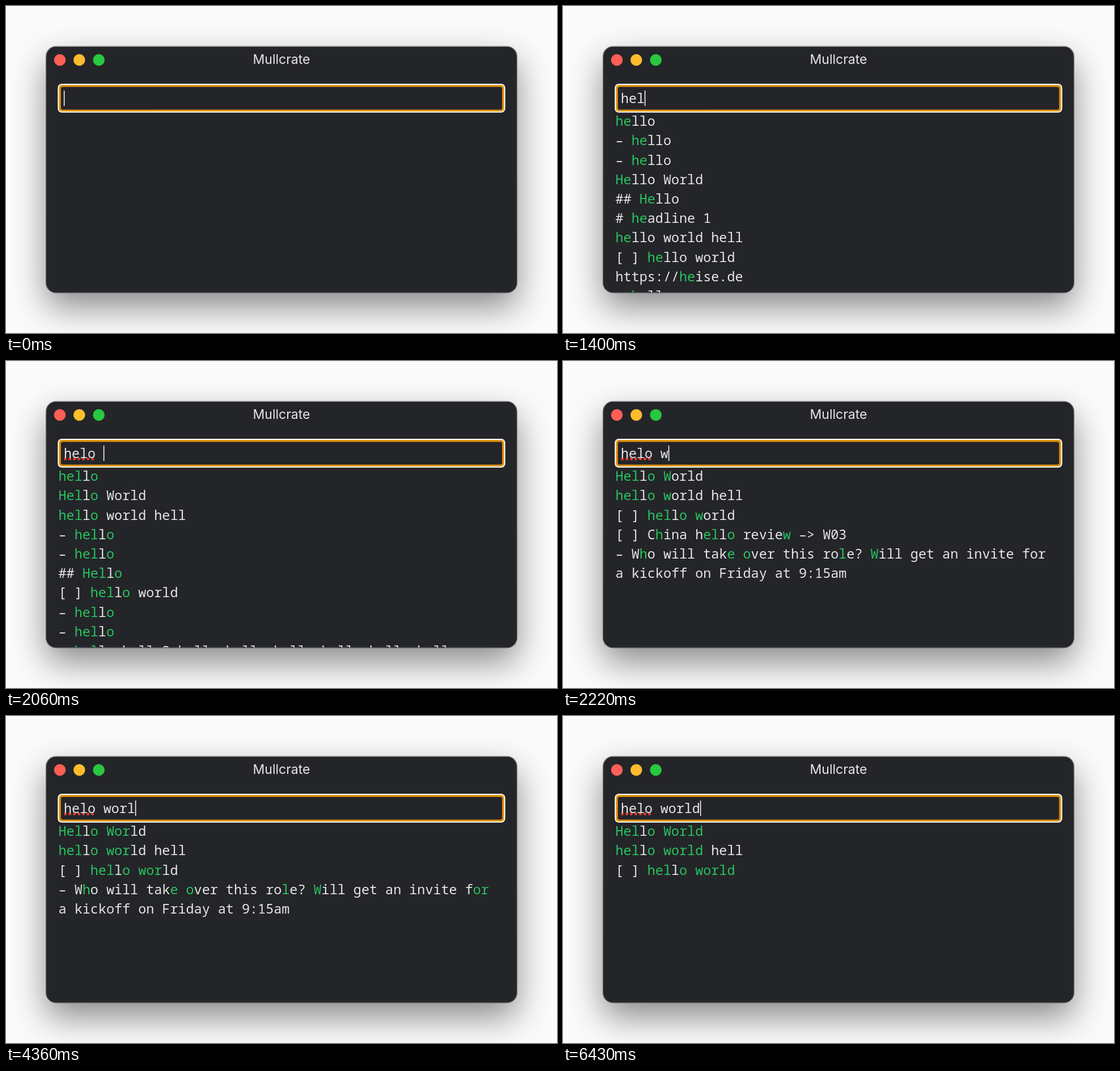
Animation, 972 px wide and 576 px high, one loop 6680 ms. Source, as an HTML page:

```html
<!DOCTYPE html>
<html lang="en">
<head>
<meta charset="utf-8">
<title>Fuzzy search</title>
<style>
  html, body { margin: 0; width: 100%; height: 100%; overflow: hidden; background: #fafafa; }
  svg { display: block; width: 972px; height: 576px; }
  text { white-space: pre; fill: #e6e6e7; }
  .mono { font-family: "Noto Sans Mono", "DejaVu Sans Mono", monospace; font-size: 23.45px; }
  #query { font-size: 23.33px; }
  .title { font-family: Inter, sans-serif; font-size: 23px; text-anchor: middle; }
  .hit { fill: #27c45f; }
</style>
</head>
<body>
<svg viewBox="0 0 972 576">
  <defs>
    <filter id="blur" x="-30%" y="-50%" width="160%" height="200%">
      <feGaussianBlur stdDeviation="30"/>
    </filter>
    <linearGradient id="rim" x1="0" y1="0" x2="0" y2="1">
      <stop offset="0" stop-color="#8b8d8f"/>
      <stop offset=".06" stop-color="#66686a"/>
      <stop offset="1" stop-color="#55575a"/>
    </linearGradient>
    <clipPath id="frame"><rect x="71" y="72" width="830" height="432.5" rx="17"/></clipPath>
  </defs>
  <rect width="972" height="576" fill="#fafafa"/>
  <rect x="71" y="97" width="830" height="433" rx="17" opacity=".45" filter="url(#blur)"/>
  <rect x="70.7" y="71.2" width="830.6" height="433.8" rx="17.5" fill="#242529" stroke="url(#rim)" stroke-width="1.3"/>

  <circle cx="95" cy="95" r="10.3" fill="#ff5f57"/>
  <circle cx="129.3" cy="95" r="10.3" fill="#febc2e"/>
  <circle cx="163.7" cy="95" r="10.3" fill="#28c840"/>
  <text class="title" x="486" y="102">Mullcrate</text>

  <rect x="91.3" y="137" width="789.4" height="50.8" rx="7" fill="#fff"/>
  <rect x="93.3" y="139" width="785.4" height="46.8" rx="5" fill="#e0940f"/>
  <rect x="96.8" y="142.4" width="778.4" height="40" rx="3" fill="#242529"/>

  <path id="typo" d="M104.6 172.6H153" stroke="#d93a32" stroke-width="5" stroke-linecap="round" stroke-dasharray="0 8"/>
  <text id="query" class="mono" x="101.9" y="171"></text>
  <rect id="caret" y="149" width="1.5" height="27" fill="#fff"/>
  <g id="results" clip-path="url(#frame)"></g>
</svg>
<script>
const LOOP = 6680;
const LEFT = 92.5, BASELINE = 211.2, LINE = 34.2;
const CARET_X = 101.9, CARET_STEP = 14;

const plain = 'hello', bullet = '– hello', heading = '## Hello';
const title = 'Hello World', phrase = 'hello world hell', task = '[ ] hello world';
const review = '[ ] China hello review –> W03';
const question = '– Who will take over this role? Will get an invite for\na kickoff on Friday at 9:15am';
const chorus = '– hello hello? hello hello hello hello hello hello';

const ranked = {
  '': [],
  he: [plain, bullet, bullet, title, heading, '# headline 1', phrase, task, 'https://heise.de', bullet],
  hel: [plain, bullet, bullet, title, heading, phrase, task, bullet, review, bullet],
  helo: [plain, title, phrase, bullet, bullet, heading, task, bullet, bullet, chorus],
};
const longQueryRows = [title, phrase, task, review, question];

// time, typed text, searched text, caret visible
const timeline = [
  [0, '', '', 1],
  [500, '', '', 0],
  [1000, '', '', 1],
  [1160, 'h', '', 1],
  [1240, 'he', 'he', 1],
  [1400, 'hel', 'he', 1],
  [1480, 'hel', 'hel', 1],
  [1810, 'helo', 'helo', 1],
  [2060, 'helo ', 'helo', 1],
  [2140, 'helo w', 'helo', 1],
  [2220, 'helo w', 'helow', 1],
  [2300, 'helo wo', 'helowo', 1],
  [2550, 'helo wor', 'helowo', 1],
  [2630, 'helo wor', 'helowor', 1],
  [3040, 'helo wor', 'helowor', 0],
  [3370, 'helo word', 'heloword', 1],
  [3870, 'helo word', 'heloword', 0],
  [4120, 'helo wor', 'heloword', 0],
  [4200, 'helo wor', 'helowor', 0],
  [4360, 'helo worl', 'helowor', 1],
  [4440, 'helo worl', 'heloworl', 1],
  [4520, 'helo world', 'heloworld', 1],
  [4930, 'helo world', 'heloworld', 0],
  [5430, 'helo world', 'heloworld', 1],
  [5930, 'helo world', 'heloworld', 0],
  [6430, 'helo world', 'heloworld', 1],
];

const byId = id => document.getElementById(id);
const query = byId('query'), caret = byId('caret'), typo = byId('typo'), results = byId('results');

function svg(tag, attrs, parent) {
  const node = document.createElementNS('http://www.w3.org/2000/svg', tag);
  for (const key in attrs) node.setAttribute(key, attrs[key]);
  return parent.appendChild(node);
}

function subsequence(text, key) {
  const hits = new Set();
  let from = 0;
  for (const letter of key) {
    const at = text.indexOf(letter, from);
    if (at < 0) return null;
    hits.add(at);
    from = at + 1;
  }
  return hits;
}

// A whole substring wins, then letters in order, then one swapped pair.
function match(text, key) {
  const lower = text.toLowerCase();
  const start = lower.indexOf(key);
  if (start >= 0) return new Set([...key].map((_, i) => start + i));
  return subsequence(lower, key) || subsequence(lower, key.replace('lo', 'ol'));
}

function drawResults(key) {
  results.replaceChildren();
  let line = 0;
  for (const text of ranked[key] || longQueryRows) {
    const hits = match(text, key);
    if (!hits) continue;
    let offset = 0;
    for (const part of text.split('\n')) {
      const row = svg('text', { class: 'mono', x: LEFT, y: BASELINE + LINE * line++ }, results);
      let run = null, runHit;
      [...part].forEach((letter, i) => {
        const hit = hits.has(offset + i);
        if (!run || hit !== runHit) run = svg('tspan', hit ? { class: 'hit' } : {}, row);
        runHit = hit;
        run.textContent += letter;
      });
      offset += part.length + 1;
    }
  }
}

let shownKey = null;

function render(time) {
  const [, typed, key, caretOn] = timeline.findLast(step => step[0] <= time);
  query.textContent = typed;
  caret.setAttribute('x', CARET_X + CARET_STEP * typed.length);
  caret.style.display = caretOn ? '' : 'none';
  typo.style.display = typed.includes(' ') ? '' : 'none';
  if (key !== shownKey) drawResults(shownKey = key);
}

const begin = performance.now();
function tick() {
  render((performance.now() - begin) % LOOP);
  requestAnimationFrame(tick);
}
tick();
</script>
</body>
</html>
```
